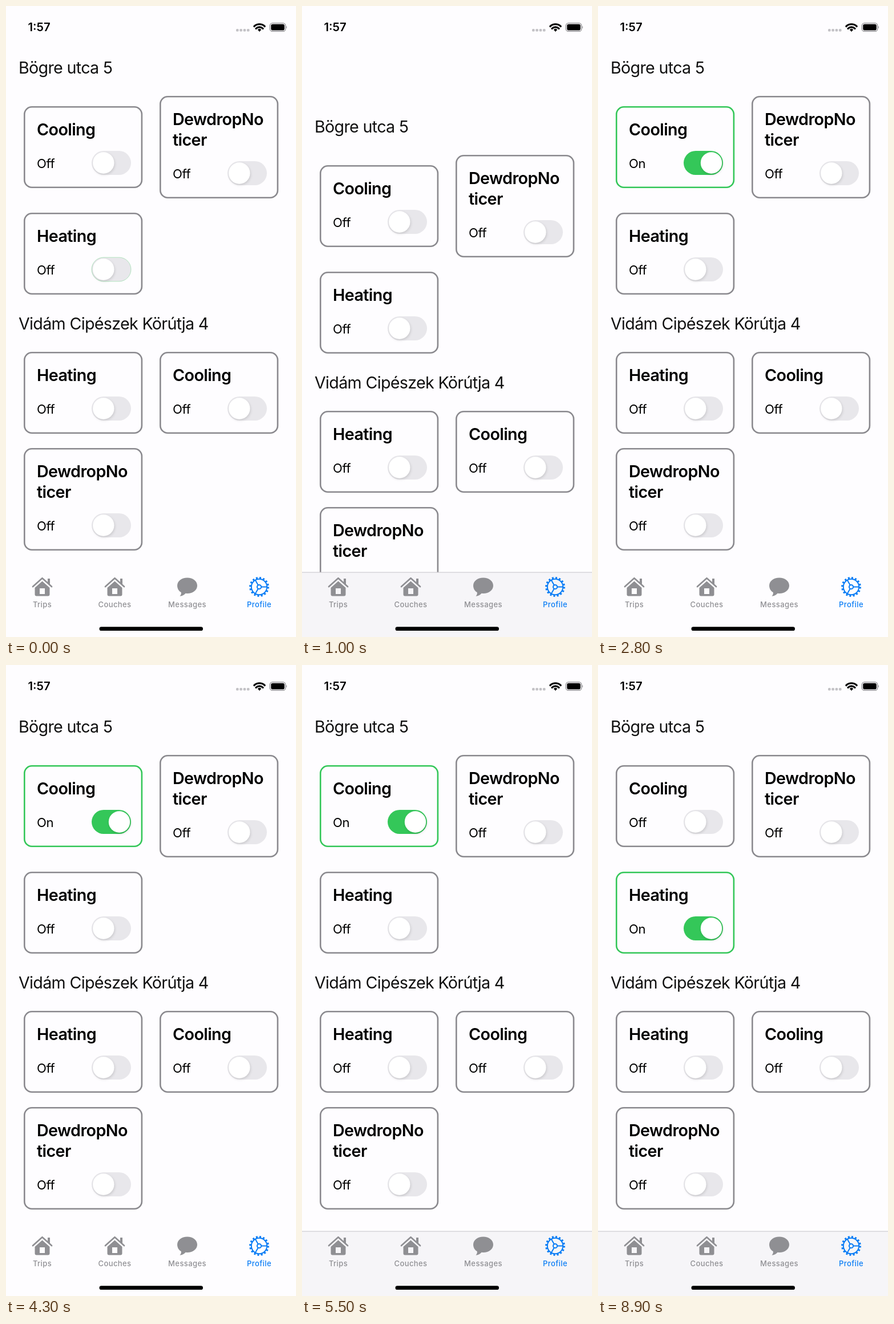
Recreate the animation shown at these times as an HTML page. Size 508 by 1102 pixels, loop 9000 ms.

```html
<!DOCTYPE html>
<html lang="en">
<head>
<meta charset="utf-8">
<title>Smart home</title>
<style>
@property --on { syntax: "<number>"; inherits: true; initial-value: 0; }
@property --map { syntax: "<number>"; inherits: true; initial-value: 0; }
html, body { margin: 0; width: 100%; height: 100%; overflow: hidden; background: #fefdff; }
svg { display: block; width: 508px; height: 1102px; font-family: Inter, "Open Sans", sans-serif; animation: page 9s step-end infinite; }
.head { font-size: 28.7px; letter-spacing: -.7px; fill: #111; }
.name { font-size: 28.7px; font-weight: 600; letter-spacing: -.6px; }
.state { font-size: 22.1px; letter-spacing: -.3px; }
.tab { font-size: 13px; font-weight: 500; letter-spacing: .4px; text-anchor: middle; }
.time { font-size: 20.3px; font-weight: 600; }
.line { fill: none; stroke-linecap: round; stroke-linejoin: round; }

.frame { fill: none; stroke-width: 2.6; stroke: color-mix(in srgb, #34c759 calc(var(--on) * 100%), #8a898e); }
.track { fill: color-mix(in srgb, #34c759 calc(var(--on) * 100%), #e8e7eb); }
.thumb { fill: #fff; transform: translateX(calc(var(--on) * 27.7px)); filter: drop-shadow(1px 2px 2px #0002); }
.on { opacity: calc((var(--on) - .5) * 999); }
.off { opacity: calc((.5 - var(--on)) * 999); }

.cool, .heat, .scroll, .bar { animation: 9s linear infinite; }
.cool { animation-name: cool; }
.heat { animation-name: heat; }
.scroll { animation-name: scroll; }
.bar { animation-name: bar; }
.heat .track { animation: rim 9s step-end infinite; }
.map { opacity: var(--map); }
.grey { color: #8f8f93; }
.trips { color: color-mix(in srgb, #087cf5 calc(var(--map) * 100%), #8f8f93); }
.profile { color: color-mix(in srgb, #8f8f93 calc(var(--map) * 100%), #087cf5); }

@keyframes page {
  0% { --map: 0; }
  50% { --map: 1; }
  61.1%, 100% { --map: 0; }
}
@keyframes cool {
  0%, 21% { --on: 0; }
  24.2%, 81% { --on: 1; }
  84.2%, 100% { --on: 0; }
}
@keyframes heat {
  0%, 90% { --on: 0; }
  93.2%, 100% { --on: 1; }
}
@keyframes rim {
  0% { stroke: #34c75955; }
  1.1%, 100% { stroke: none; }
}
@keyframes scroll {
  0%, 1% { transform: none; animation-timing-function: ease-in-out; }
  3.9% { transform: translateY(-77px); animation-timing-function: ease-in-out; }
  11.1%, 11.7% { transform: translateY(103px); animation-timing-function: cubic-bezier(.2, .65, .3, 1); }
  17.8%, 100% { transform: none; }
}
@keyframes bar {
  0%, 8.3% { opacity: 0; }
  9.4%, 12.8% { opacity: 1; }
  14.2%, 49.99% { opacity: 0; }
  50%, 100% { opacity: 1; }
}

.town { font-weight: 500; fill: #333; stroke: #fffc; stroke-width: 2.5; paint-order: stroke; letter-spacing: .1px; }
.park { font-size: 12px; font-weight: 600; fill: #43a047; stroke: #fffb; stroke-width: 2; paint-order: stroke; }
.water { font-size: 12px; font-weight: 500; font-style: italic; fill: #3487b5; text-anchor: middle; }
.sign { font-weight: 600; text-anchor: middle; }
</style>
</head>
<body>
<svg id="stage" viewBox="0 0 508 1102"></svg>
<script>
const text = (cls, x, y, str, extra = '') => `<text class="${cls}" x="${x}" y="${y}" ${extra}>${str}</text>`;
const rect = (x, y, w, h, r, fill) => `<rect x="${x}" y="${y}" width="${w}" height="${h}" rx="${r}" fill="${fill}"/>`;
const dot = (x, y, r, fill) => `<circle cx="${x}" cy="${y}" r="${r}" fill="${fill}"/>`;
const range = n => [...Array(n).keys()];

let seed = 7;
const rnd = (a = 0, b = 1) => {
  seed = (seed * 16807) % 2147483647;
  return a + (b - a) * seed / 2147483647;
};

// Catmull-Rom curve through the points.
function curve(p, closed) {
  const n = p.length;
  const at = i => closed ? p[(i + n) % n] : p[Math.max(0, Math.min(n - 1, i))];
  const lean = (a, b, c) => [a[0] + (c[0] - b[0]) / 6, a[1] + (c[1] - b[1]) / 6];
  let d = 'M' + p[0];
  for (let i = 0; i < (closed ? n : n - 1); i++)
    d += `C${lean(at(i), at(i - 1), at(i + 1))} ${lean(at(i + 1), at(i + 2), at(i))} ${at(i + 1)}`;
  return d;
}
const line = (color, w, ...p) => `<path class="line" d="${curve(p)}" stroke="${color}" stroke-width="${w}"/>`;

// Closed shape with a wobbling edge.
function blob(fill, x, y, rx, ry, rough = .22) {
  const n = Math.round(8 + (rx + ry) / 14);
  const p = range(n).map(i => {
    const a = i / n * 2 * Math.PI, r = 1 + rnd(-rough, rough);
    return [x + rx * r * Math.cos(a), y + ry * r * Math.sin(a)];
  });
  return `<path d="${curve(p, true)}" fill="${fill}"/>`;
}

/* Device list */
function card(x, y, names, cls = '') {
  const h = 107 + names.length * 36, c = y + h - 44;
  return `<g class="${cls}">
    <rect class="frame" x="${x + 1.3}" y="${y + 1.3}" width="205.6" height="${h - 2.6}" rx="13"/>
    ${names.map((s, i) => text('name', x + 23, y + 51 + i * 36, s)).join('')}
    ${text('state off', x + 23, c + 8.5, 'Off')}${text('state on', x + 23, c + 8.5, 'On')}
    <rect class="track" x="${x + 119}" y="${c - 21}" width="69" height="42" rx="21"/>
    <circle class="thumb" cx="${x + 139.8}" cy="${c}" r="18.7"/></g>`;
}
const left = 31, right = 269, sensor = ['DewdropNo', 'ticer'];
const home = `<g class="scroll">
  ${text('head', 22, 118, 'Bögre utca 5')}
  ${card(left, 175, ['Cooling'], 'cool')}${card(right, 157, sensor)}${card(left, 361, ['Heating'], 'heat')}
  ${text('head', 22, 565, 'Vidám Cipészek Körútja 4')}
  ${card(left, 604, ['Heating'])}${card(right, 604, ['Cooling'])}${card(left, 772, sensor)}
</g>`;

/* Map */
const forest = '#b9dc98', city = '#f0ede9', water = '#82d5f4', road = '#a2a9c3', lane = '#b9bac9';
const hub = [264, 540];

const place = (name, x, y, big = false, end = false) => ({ name, x, y, big, end });
const places = [
  place('Chľaba', 16, 15), place('Szob', 78, 45), place('Verőce', 247, 49), place('Kisoroszi', 237, 64),
  place('Visegrád', 183, 93), place('Vác', 342, 105), place('Dömös', 127, 128), place('Sződliget', 364, 172),
  place('Pilisszentlászló', 201, 188), place('Göd', 349, 243), place('Piliscsév', 29, 258),
  place('Szentendre', 289, 271, true), place('Pomáz', 235, 302), place('Dunakeszi', 344, 326, true),
  place('Pilisvörösvár', 123, 343), place('Budakalász', 260, 356), place('Mogyor', 453, 380),
  place('Solymár', 149, 386), place('Nagykovácsi', 95, 410), place('Csömör', 443, 450), place('Kis', 484, 471),
  place('Budakeszi', 140, 521, false, true), place('eghalom', 62, 523, false, true), place('Biatorbágy', 33, 564, true),
  place('Budaörs', 166, 594, true, true), place('Ve', 482, 663, true), place('Érd', 125, 687, true, true),
  place('Gyál', 431, 702, true), place('Tárnok', 71, 731), place('Szigetszentmiklós', 259, 752, true),
  place('Martonvásár', -2, 804), place('Százhalombatta', 109, 807, true), place('Alsónémedi', 382, 805, true),
  place('Szigethalom', 220, 827), place('Ócsa', 445, 840, true), place('Dunavarsány', 281, 863),
  place('Szigetcsép', 181, 879), place('Ercsi', 116, 905), place('Szigetszentmárton', 172, 932), place('Bugyi', 362, 934, true)
];
const towns = places.map(({ name, x, y, big, end }) => dot(x, y, big ? 3 : 2.2, '#111') +
  text('town', x + (end ? -5 : 5.5), y, name, `text-anchor="${end ? 'end' : 'start'}" font-size="${big ? 14.8 : 13.1}"`)).join('');
const suburbs = places.map(p => blob(city, p.x, p.y, p.big ? 28 : 16, p.big ? 19 : 11, .35)).join('');

// Country lanes join every town to its three nearest neighbours.
const lanes = places.map(a => {
  const gap = b => Math.hypot(a.x - b.x, a.y - b.y);
  return [...places].sort((b, c) => gap(b) - gap(c)).slice(1, 4).map(b =>
    line(lane, 1.8, [a.x, a.y], [(a.x + b.x) / 2 + rnd(-9, 9), (a.y + b.y) / 2 + rnd(-9, 9)], [b.x, b.y])).join('');
}).join('');

const woods =
  blob(forest, 185, 165, 115, 75) + blob(forest, 85, 170, 65, 55) + blob(forest, 200, 250, 35, 38) +
  blob(forest, 50, 400, 75, 75) + blob(forest, 140, 445, 55, 48) + blob(forest, 145, 525, 40, 22) +
  blob(forest, 500, 160, 25, 55) + blob(forest, 453, 880, 20, 25) + blob(forest, 260, 4, 65, 18) +
  range(24).map(() => blob(forest, rnd(0, 508), rnd(100, 930), rnd(4, 15), rnd(4, 13), .4)).join('');
const downtown = blob(city, 340, 520, 155, 100) + blob(city, 310, 420, 65, 85) + blob(city, 290, 635, 80, 82);

// Streets fan out from the hub, with short side streets between them.
const fan = range(24).map(i => {
  const a = i * 2.4, b = a + rnd(-.3, .3), r = rnd(110, 260);
  return `M${hub}q${r / 2 * Math.cos(b)} ${r / 2 * Math.sin(b)} ${r * Math.cos(a)} ${r * Math.sin(a)}`;
}).join('');
const sides = range(75).map(() => `M${rnd(200, 490)} ${rnd(350, 710)}l${rnd(-30, 30)} ${rnd(-30, 30)}l${rnd(-25, 25)} ${rnd(-25, 25)}`).join('');
const rings = [45, 75, 110].map(r => `M${hub[0]} ${hub[1] - r}a${r * .8} ${r} 0 0 1 0 ${2 * r}`).join('');
const street = (d, color, w) => `<path class="line" d="${d}" stroke="${color}" stroke-width="${w}" clip-path="url(#edge)"/>`;

const highway = (...p) => line(road, 5, ...p) + line('#bac0d6', 1.5, ...p);
const toHub = (...p) => line(road, 3.4, ...p, hub);
const roads =
  highway([0, 526], [60, 545], [105, 603], [215, 590], hub) +
  highway([0, 765], [85, 655], [105, 603], [180, 675], [230, 706], [360, 724], [415, 745], [508, 688]) +
  highway([342, 98], [358, 160], [345, 322], [300, 378]) +
  highway([385, 98], [402, 140], [376, 225], [376, 320], [345, 327]) +
  highway([300, 372], [366, 372], [390, 412], [430, 388], [508, 380]) +
  highway([390, 410], [430, 455], [508, 472]) +
  highway(hub, [330, 630], [415, 745], [508, 832]) +
  highway(hub, [240, 660], [110, 745], [72, 860], [32, 940]) +
  highway([415, 745], [330, 880], [300, 940]) +
  toHub([0, 298], [80, 338], [192, 372], [240, 455]) + toHub([290, 375], [262, 440]) +
  toHub([508, 545], [410, 545], [350, 525]) + toHub([508, 662], [430, 605]) + toHub([508, 385], [370, 440]);

const rivers =
  line(water, 9, [118, 92], [145, 123], [178, 92]) +
  line(water, 10, [345, 94], [349, 190], [334, 320], [290, 400]) +
  line(water, 8, [334, 320], [290, 400], [258, 480], [258, 530], [276, 570], [258, 655], [190, 705], [164, 750], [130, 850], [122, 945]) +
  line(water, 5, [288, 94], [307, 140], [304, 300], [288, 395]) +
  line(water, 3.5, [270, 590], [322, 670], [285, 770], [195, 880], [174, 945]) +
  blob(water, 291, 333, 6, 7) + blob(water, 275, 695, 10, 9) + blob(water, 295, 887, 26, 8, .5);

const sign = (x, y, s, w, h, fill, ink, edge, size) =>
  `<rect x="${x - w / 2}" y="${y - h / 2}" width="${w}" height="${h}" rx="4" fill="${fill}" stroke="${edge}" stroke-width="1.6"/>` +
  text('sign', x, y + size * .37, s, `fill="${ink}" font-size="${size}"`);
const plain = (x, y, s) => sign(x, y, s, 32, 18, '#fff', '#222', '#555', 11);
const green = (x, y, s, w = 22, size = 11) => sign(x, y, s, w, 20, '#13a07c', '#fff', '#eafff6', size);
const park = (x, y, top, low) => dot(x - 12.5, y + 1, 9.5, '#43a047') +
  `<path d="M${x - 12.5} ${y - 5}l4.5 8h-3.7v3h-1.6v-3h-3.7z" fill="#fff"/>` + text('park', x, y, top) + text('park', x, y + 13, low);
const flow = (x, y, turn) => text('water', 0, 0, 'Duna', `transform="translate(${x} ${y}) rotate(${turn})"`);
const pin = (x, y) => `<g filter="drop-shadow(0 2px 2px #0004)">
  <path d="M${x - 8} ${y + 16}L${x} ${y + 24}L${x + 8} ${y + 16}Z" fill="#fb484f"/>${dot(x, y, 19, '#fb484f')}</g>
  ${dot(x, y - 7, 4.6, '#fff')}<path class="line" d="M${x} ${y - 4}V${y + 11}" stroke="#fff" stroke-width="2.2"/>`;

const marks =
  park(167, 11, 'Duna-Ipoly', 'Nemzeti Park') + park(80, 431, 'Budai Tájvédelmi', 'Körzet') +
  rect(468, 616, 20, 20, 4, '#4a8fe7') +
  '<path d="M478 619l1.5 5 6 4v2l-6-2-.5 4 2 2h-6l2-2-.5-4-6 2v-2l6-4z" fill="#fff" transform="rotate(45 478 626)"/>' +
  ['Bu', 'Re'].map((s, i) => text('park', 491, 625 + i * 13, s, 'style="fill:#3b7fd9"')).join('') +
  flow(254, 515, 84) + flow(127, 849, -80) +
  plain(476, 240, '2104') + plain(390, 382, '2102') + plain(50, 693, '8107') + plain(74, 891, '6204') +
  green(8, 295, '10') + green(326, 568, '4') + green(241, 663, '6') + green(104, 633, 'E71', 30, 13) + green(29, 943, '', 30) +
  sign(357, 697, 'M51', 34, 24, '#2879e4', '#fff', '#e8f1ff', 13.5) + pin(194, 507) + pin(251, 574);

const map = `<g class="map">
  ${rect(0, 0, 508, 1102, 0, '#dfeebe')}
  ${woods}${suburbs}${downtown}
  ${blob('#d8e0ef', 490, 625, 48, 24)}${blob('#dde1ea', 195, 757, 20, 14)}
  <clipPath id="edge">${downtown}</clipPath>
  ${street(fan + sides, '#d2d1d6', 1.2)}${street(rings, lane, 2)}
  ${lanes}${rivers}${roads}${towns}${marks}
  ${rect(0, 24, 508, 74.5, 0, '#fffffff0')}${rect(0, 98, 508, 1, 0, '#c9c9c9')}
  ${rect(11, 37, 486, 49, 10, '#dddce0c4')}
  <g class="line" stroke="#77767a" stroke-width="2.2"><circle cx="31" cy="60" r="8"/><path d="M37 66l6.5 6.5"/></g>
  <path d="M0 989V951Q0 937 14 937H494Q508 937 508 951V989Z" fill="#fefdff"/>
  ${rect(213.5, 958.5, 81.5, 8.5, 4.2, '#8b8a8f')}
</g>`;

/* Bars */
const house = x => `<g transform="translate(${x} 1014)">
  <path class="line" d="M-16.5 0L0-14.8L16.5 0" stroke="currentColor" stroke-width="2.7"/>
  <path d="M9.5-14h4V-3.500L9.5-7ZM-13 2L0-9.500L13 2V13.5Q13 16.5 10 16.5H-10Q-13 16.5-13 13.5ZM-4.5 3V13H4.5V3Z" fill="currentColor" fill-rule="evenodd"/></g>`;
const bubble = `<path d="M317.5 998.500c10 0 17.5 6 17.5 13.700s-7.5 13.800-17.5 13.800l-3-.2c-2.5 2.800-6 4.700-10 5 2-2 2.700-4.500 2.200-6.700-4.200-2.500-6.700-6.900-6.700-11.900 0-7.700 7.5-13.700 17.5-13.700z" fill="currentColor"/>`;
const gear = `<g class="line" transform="translate(443.5 1014.5)" stroke="currentColor" stroke-width="2">
  <circle r="13.7"/><circle r="3.6"/><circle r="15.8" stroke-width="3.2" stroke-linecap="butt" stroke-dasharray="3 3.205"/>
  ${[0, 120, 240].map(a => `<path d="M4 0H13" transform="rotate(${a})"/>`).join('')}</g>`;
const tab = (cls, x, icon, label) => `<g class="${cls}">${icon}${text('tab', x, 1050, label, 'fill="currentColor"')}</g>`;

const bars = `
  <radialGradient id="shade"><stop stop-color="#dfdfde"/><stop offset="1" stop-color="#f3f2f4"/></radialGradient>
  <g class="bar">${rect(0, 989, 508, 113, 0, '#f6f5f8')}
    <g class="map">${rect(0, 989, 508, 113, 0, '#f3f2f4')}<ellipse cx="150" cy="1072" rx="110" ry="30" fill="url(#shade)"/></g>
    ${rect(0, 988.5, 508, 1.2, 0, '#cdccd0')}</g>
  ${tab('trips', 63.5, house(63.5), 'Trips')}${tab('grey', 190.5, house(190.5), 'Couches')}
  ${tab('grey', 317.5, bubble, 'Messages')}${tab('profile', 443.5, gear, 'Profile')}
  ${rect(163.5, 1084.3, 181.5, 6.8, 3.4, '#000')}
  ${text('time', 38.5, 44.3, '1:57')}
  ${range(4).map(i => rect(403 + i * 6.3, 40, 4.6, 4.6, 1.6, '#c3c2c6')).join('')}
  <g class="line" stroke="#000" stroke-width="3.2" stroke-linecap="butt"><path d="M434.8 35.5a13.2 13.2 0 0 1 18.4 0M438 39.3a8.5 8.5 0 0 1 12 0"/></g>
  <path d="M440.7 41.3a4.8 4.8 0 0 1 6.6 0L444 45z"/>
  <rect x="462.3" y="29.8" width="27.4" height="14.6" rx="4.5" fill="none" stroke="#8b8a8e" stroke-width="1.3"/>
  ${rect(464.2, 31.7, 23.6, 10.8, 2.8, '#000')}<path d="M491 34.7q2 2.4 0 4.8z" fill="#8b8a8e"/>`;

document.getElementById('stage').innerHTML = rect(0, 0, 508, 1102, 0, '#fefdff') + home + map + bars;
</script>
</body>
</html>
```
